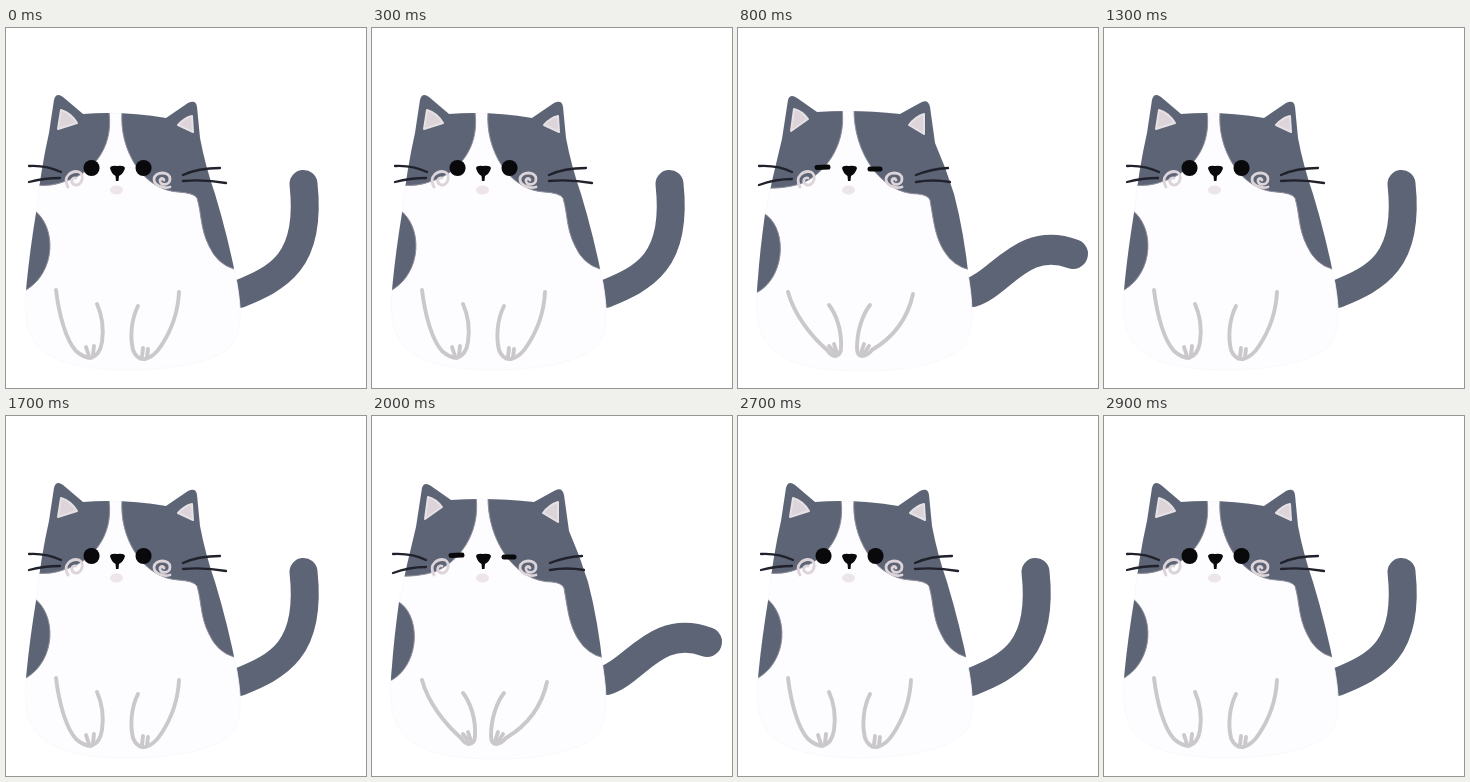
These frames come from a looping animation (360x360 px, 3000 ms). An HTML page with a canvas:

```html
<!DOCTYPE html>
<html lang="en">
<head>
<meta charset="utf-8">
<title>Blinking cat</title>
<style>
  html, body { margin: 0; width: 100%; height: 100%; overflow: hidden; background: #fff; }
  canvas { display: block; }
</style>
</head>
<body>
<canvas width="360" height="360"></canvas>
<script>
const ctx = document.querySelector('canvas').getContext('2d');
ctx.lineCap = ctx.lineJoin = 'round';

const FUR = '#5c6475', WHITE = '#fdfcfe', INK = '#09090c', LINE = '#cac8cb', BLUSH = '#ddd4da';

// Each part holds its awake and its sleepy outline, with matching commands.
const body = [
  'M43 105 L48 72 Q50 64 57 69 L77 86 Q118 83 160 90 L182 75 Q190 71 191 79 L194 110 Q199 137 209 166 Q222 209 231 255 C236 284 236 306 225 318 C205 336 165 341 126 342 C85 342 50 337 33 319 C18 305 18 280 21 252 Q24 222 30 185 Q35 140 43 105 Z',
  'M44 111 L50 72 Q52 65 59 70 L79 84 Q118 81 162 86 L182 75 Q190 70 192 79 L197 115 Q208 140 216 166 Q226 204 231 252 C236 284 235 306 225 319 C205 337 165 343 126 343 C85 343 50 338 33 320 C18 306 17 280 20 250 Q22 222 27 186 Q35 147 44 111 Z'
];
const patches = [
  ['M30 157 Q45 159 60 153 C84 146 108 122 103 84 L70 50 L20 50 Z',
   'M28 160 Q45 161 62 156 C86 147 109 118 104 80 L70 50 L20 50 Z'],
  ['M116 84 C113 122 137 162 172 164 Q188 165 191 170 C196 187 194 200 203 218 Q211 236 228 241 L250 241 L220 50 L150 50 Z',
   'M116 80 C115 124 143 166 180 166 Q190 167 192 172 C196 195 197 208 206 223 Q215 238 232 242 L250 242 L220 50 L150 50 Z'],
  ['M28 182 C51 199 50 244 20 262 L10 262 L10 182 Z',
   'M25 185 C49 197 49 247 20 264 L10 264 L10 185 Z']
];
const ears = [
  ['M55 82 L52 101 L71 95 Q65 85 55 82 Z', 'M56 81 L53 103 L70 91 Q64 83 56 81 Z'],
  ['M186 88 Q178 90 172 97 L187 104 Z', 'M186 86 Q177 89 171 97 L186 106 Z']
];
const paws = [
  ['M50 262 C53 287 60 312 70 323 Q78 330 85 330 Q94 327 96 314 C98 300 96 287 91 276',
   'M50 264 C56 286 72 307 89 322 Q93 328 97 328 Q103 327 103 320 C104 302 98 286 91 277'],
  ['M80 319 L83 328 M88 318 L87 327', 'M91 318 L97 326 M96 316 L99 325'],
  ['M132 278 C125 292 124 309 127 322 Q131 332 139 331 Q148 329 155 318 C165 303 172 284 173 264',
   'M132 277 C125 286 119 302 119 320 Q119 328 124 328 Q129 328 134 322 C156 309 170 289 175 266'],
  ['M137 320 L136 329 M142 321 L141 329', 'M126 316 L123 325 M131 318 L126 326']
];
const whiskers = [
  ['M23 138 Q40 137 55 144 M23 154 Q38 150 54 150', 'M21 138 Q40 137 54 144 M21 157 Q37 151 54 151'],
  ['M177 147 Q192 140 214 140 M177 153 Q198 151 220 155', 'M178 147 Q193 141 210 140 M178 154 Q195 151 212 154']
];
const eyes = [
  ['M85.5 140 L85.6 140', 'M79 139.5 L90 139'],
  ['M137.5 140 L137.6 140', 'M132 141 L142 141']
];
const swirls = [
  'M62 159 C56 148 66 142 73 144 C79 147 76 158 69 157 C64 155 65 149 70 150',
  'M164 159 C156 161 148 157 148 151 C149 143 164 143 164 151 C164 158 153 158 154 152 C155 150 157 150 158 152'
];
const nose = 'M104 140 Q105 137 111 138 Q118 137 119 140 Q118 145 113 148 L112.5 153 L110 153 L109.5 148 Q105 145 104 140 Z';
const tails = [
  'M233 266 C272 250 306 234 297.5 156',
  'M233 265 C266 254 302 228 324 180',
  'M234 264 C262 256 285 207 335 226'
];

const mix = (a, b, t) => a + (b - a) * t;

function blend([awake, sleepy], t) {
  const goal = sleepy.match(/[\d.]+/g);
  let i = 0;
  return new Path2D(awake.replace(/[\d.]+/g, n => mix(+n, +goal[i++], t)));
}

function fill(path, color) {
  ctx.fillStyle = color;
  ctx.fill(path);
}

function stroke(path, color, width) {
  ctx.strokeStyle = color;
  ctx.lineWidth = width;
  ctx.stroke(path);
}

function draw(sleep) {
  ctx.clearRect(0, 0, 360, 360);
  stroke(new Path2D(tails[sleep * 2]), FUR, mix(28, 30, sleep));

  const outline = blend(body, sleep);
  fill(outline, WHITE);
  stroke(outline, '#f8f6fa', 0.8);
  ctx.save();
  ctx.clip(outline);
  patches.forEach(p => {
    const patch = blend(p, sleep);
    fill(patch, FUR);
    stroke(patch, '#8f8f9b', 1);
  });
  ctx.restore();

  ears.forEach(pair => {
    const ear = blend(pair, sleep);
    fill(ear, BLUSH);
    stroke(ear, '#e6e1e5', 2);
  });
  paws.forEach(p => stroke(blend(p, sleep), LINE, 3.9));
  swirls.forEach(s => stroke(new Path2D(s), BLUSH, 2.8));
  whiskers.forEach(p => stroke(blend(p, sleep), '#20212b', 2.3));
  eyes.forEach(p => stroke(blend(p, sleep), INK, mix(16, 5, sleep)));
  fill(new Path2D(nose), INK);

  const mouth = new Path2D();
  mouth.ellipse(110.5, 162, 6.5, 4.5, 0, 0, Math.PI * 2);
  fill(mouth, '#eee5eb');
}

// Awake for 600 ms, then asleep for 600 ms with a 100 ms in-between on each side.
function sleepAt(ms) {
  const t = ms % 3000 % 1200;
  if (t < 600) return 0;
  return t < 700 || t >= 1100 ? 0.5 : 1;
}

const start = performance.now();
function tick() {
  draw(sleepAt(performance.now() - start));
  requestAnimationFrame(tick);
}
tick();
</script>
</body>
</html>
```
